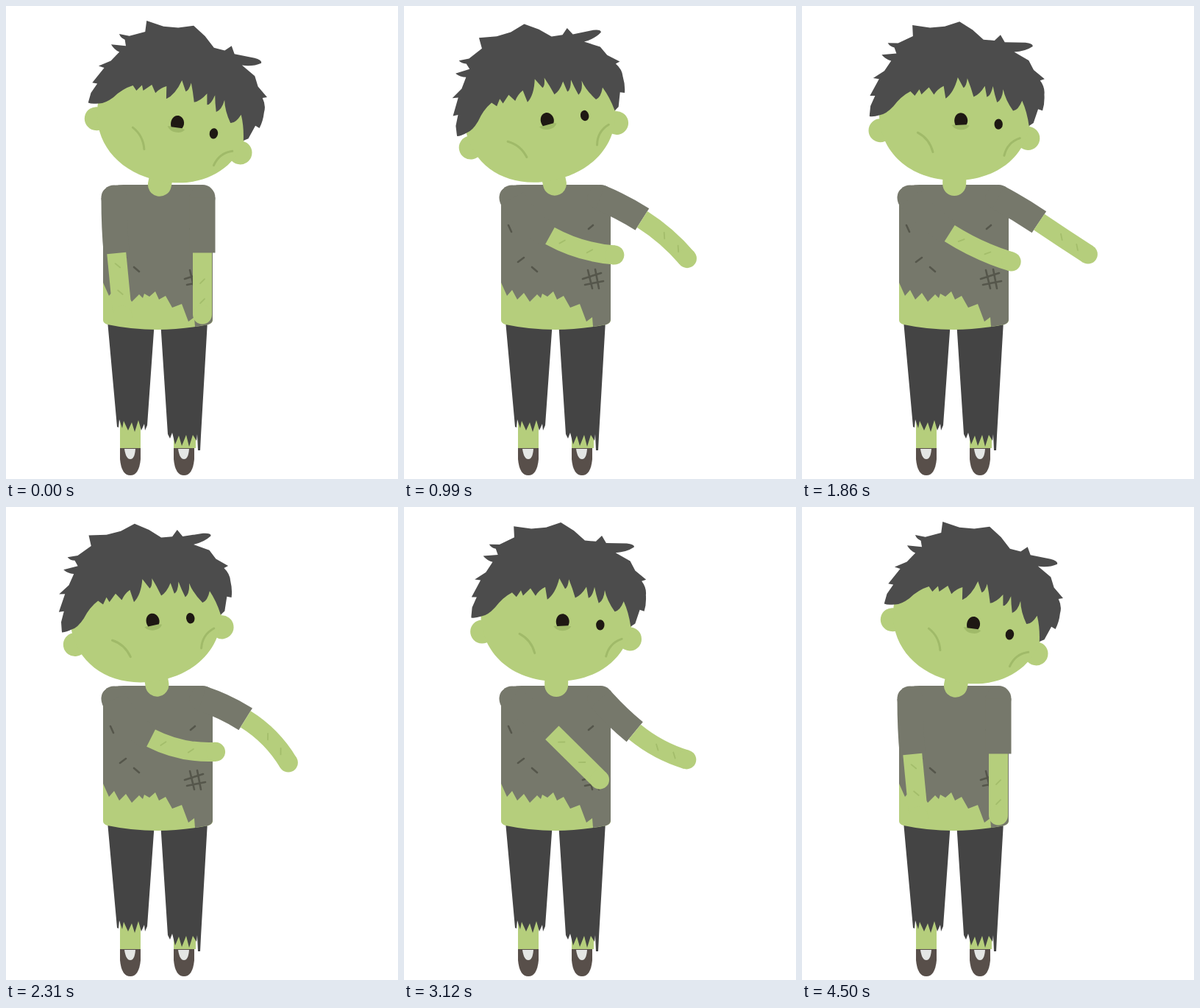
Recreate the animation shown at these times as an HTML page. Size 533 by 643 pixels, loop 4530 ms.

```html
<!DOCTYPE html>
<html>
<head>
<meta charset="utf-8">
<style>
html, body { margin: 0; height: 100%; overflow: hidden; background: #fff; }
svg { display: block; width: 100vw; height: 100vh; }
.skin { fill: #b5ce7c; }
.shirt { fill: #76786b; }
.hair { fill: #4c4c4c; }
.pants { fill: #444; }
.eye { fill: #1e1813; }
.crease { fill: none; stroke: #a0ba69; stroke-width: 3; stroke-linecap: round; }
.stitch { fill: none; stroke: #55564b; stroke-width: 2.6; stroke-linecap: round; }
.sleeve { fill: none; stroke: #76786b; stroke-width: 35; }
.forearm { fill: none; stroke: #b5ce7c; stroke-width: 26; }
.scar { stroke: #a3bd6b; stroke-width: 1.8; stroke-linecap: round; }
</style>
</head>
<body>
<svg viewBox="0 0 533 643" preserveAspectRatio="none">
  <defs>
    <g id="shoe">
      <path fill="#584f4a" d="M155 601H183V616Q181 638 169 638Q157 638 155 616Z"/>
      <path fill="#e4e6e4" d="M161 602H176Q175 616 169 616Q163 616 161 602Z"/>
    </g>
  </defs>

  <path class="skin" d="M155 555H183V601H155ZM228 575H258V601H228Z"/>
  <use href="#shoe"/>
  <use href="#shoe" x="73"/>
  <path class="pants" d="M138 428L151 572 153 573 154 562 158 574 160 564 166 577 171 566 175 579 180 563 184 577 188 568 189 577 192 570 202 428Z"/>
  <path class="pants" d="M210 428L220 582 223 588 226 580 230 596 235 584 239 598 245 583 249 599 254 583 259 591 260 582 261 604H264L265 584 274 428Z"/>

  <path class="skin" d="M132 370V427Q132 431 138 433Q205 447 275 433Q281 431 281 427V370Z"/>
  <path class="shirt" d="M130 262Q129 252 136 248Q146 243 160 243H262Q281 243 281 262V426Q281 431 275 433L257 436 256 423 248 429 239 405 226 410 217 394 208 399 203 388 195 395 188 391 186 397 181 392 171 402 163 390 154 399 147 386 140 394 132 376V270Z"/>
  <path class="stitch" d="M142 298L146 307M155 348L163 342M174 355L181 361M251 303L257 298M243 371L268 363M246 379L271 374M250 359L256 384M260 358L265 384"/>

  <g id="arms"></g>

  <g id="head">
    <path class="skin" d="M191 222H223V242A16 16 0 0 1 191 242Z"/>
    <circle class="skin" cx="105" cy="171" r="16"/>
    <circle class="skin" cx="306" cy="178" r="16"/>
    <path class="skin" d="M103 148C104 200 146 237 206 237S308 200 309 148Q290 70 206 70Q122 70 103 148Z"/>
    <path class="hair" d="M90 150L91 138 97 124 90 124 102 101 94 100 109 90 118 76Q110 74 105 68L125 66 122 58Q116 57 113 52L127 52 147 42 146 27 170 30 190 28 210 21 228 32 243 45 258 46 266 38 272 48 300 48Q311 49 310 53Q300 60 285 61L305 72 312 85 327 97 321 99Q328 108 327 118Q328 130 325 140L319 138 313 157 307 161Q304 142 297 127Q292 140 285 141Q274 126 271 112Q270 126 263 130Q259 118 257 108Q254 122 249 123L246 108Q239 120 231 123Q227 110 222 98Q221 109 217 111L209 97Q204 118 193 126L190 109Q182 113 177 121L170 111 160 121 157 114 151 123 145 117Q132 124 122 138Q112 149 104 150Q95 153 90 152Z"/>
    <path class="crease" d="M156 173Q172 181 177 199M295 178Q278 184 274 202"/>
    <g id="eye">
      <path fill="#a0ba69" d="M202 162Q214 159 226 162Q223 168 214 168Q206 168 202 162Z"/>
      <path class="eye" d="M207 162C203 154 207 145 214 145S226 154 222 161Z"/>
    </g>
    <ellipse class="eye" cx="265.5" cy="159.5" rx="5.7" ry="7.2"/>
  </g>
</svg>
<script>
const LOOP = 4530, RAD = Math.PI / 180;
const $ = id => document.getElementById(id);

// time, tilt in degrees, scale of the big eye
const headKeys = [
  [300, 13, 1], [1020, -10, 1], [1800, 3, 1], [2540, -10, 1], [3120, 2.5, 1],
  [3510, 5.8, 1], [3840, 10.5, .7], [4170, 13, 1]
];

// poses: sleeve angle, sleeve length, forearm angle, forearm length, bulge
const poseTimes = [['rest', 300], ['lift', 660], ['droop', 850], ['reach', 1380],
  ['droop', 2310], ['reach', 2900], ['lower', 3120], ['rest', 3540]];
const armKeys = poses => poseTimes.map(([name, time]) => [time, ...poses[name]]);

// Smooth curve through the keys, flat at every turning point
function sample(keys, t) {
  const last = keys.length - 1;
  if (t <= keys[0][0]) return keys[0].slice(1);
  if (t >= keys[last][0]) return keys[last].slice(1);
  const i = keys.findIndex(k => k[0] > t) - 1;
  const [a, b] = [keys[i], keys[i + 1]];
  const span = b[0] - a[0], u = (t - a[0]) / span;
  const slope = (j, c) => {
    if (j === 0 || j === last) return 0;
    const [p, k, n] = [keys[j - 1], keys[j], keys[j + 1]];
    return (k[c] - p[c]) * (n[c] - k[c]) <= 0 ? 0 : (n[c] - p[c]) / (n[0] - p[0]);
  };
  return a.slice(1).map((v, n) => {
    const c = n + 1, s = u * u * (3 - 2 * u);
    return v + (b[c] - v) * s
      + span * u * (1 - u) * ((1 - u) * slope(i, c) - u * slope(i + 1, c));
  });
}

function add(parent, tag, attrs) {
  const el = document.createElementNS('http://www.w3.org/2000/svg', tag);
  for (const key in attrs) el.setAttribute(key, attrs[key]);
  return parent.appendChild(el);
}

function makeArm(x, y, scarSpots, scarSide, poses) {
  const g = $('arms'), keys = armKeys(poses);
  add(g, 'circle', { class: 'shirt', cx: x, cy: y, r: 17.5 });
  const sleeve = add(g, 'path', { class: 'sleeve' });
  const forearm = add(g, 'path', { class: 'forearm' });
  const hand = add(g, 'circle', { class: 'skin', r: 13 });
  const scars = scarSpots.map(() =>
    add(g, 'path', { class: 'scar', d: `M-3 ${-3 * scarSide}L3 ${3 * scarSide}` }));

  return t => {
    const [upper, upperLen, lower, lowerLen, bulge] = sample(keys, t);
    const ex = x + upperLen * Math.cos(upper * RAD), ey = y + upperLen * Math.sin(upper * RAD);
    const dx = Math.cos(lower * RAD), dy = Math.sin(lower * RAD);
    const hx = ex + lowerLen * dx, hy = ey + lowerLen * dy;
    const cx = (ex + hx) / 2 - 2 * bulge * dy, cy = (ey + hy) / 2 + 2 * bulge * dx;
    // the sleeve bends so that it runs straight into the forearm
    const kx = ex - (cx - ex) * .8, ky = ey - (cy - ey) * .8;
    sleeve.setAttribute('d', `M${x} ${y}Q${kx} ${ky} ${ex} ${ey}`);
    forearm.setAttribute('d', `M${ex} ${ey}Q${cx} ${cy} ${hx} ${hy}`);
    hand.setAttribute('cx', hx);
    hand.setAttribute('cy', hy);
    scars.forEach((scar, i) => {
      const u = scarSpots[i], side = 4 * bulge * u * (1 - u);
      const px = ex + u * lowerLen * dx - side * dy, py = ey + u * lowerLen * dy + side * dx;
      scar.setAttribute('transform', `translate(${px} ${py}) rotate(${lower})`);
    });
  };
}

const arms = [
  makeArm(147, 261, [.2, .63], -1, {
    rest: [87.5, 75, 84.5, 85, 0], lift: [39, 71, 35.7, 87, 0], droop: [46.7, 73, 12, 90, 6],
    reach: [36.4, 71, 38.6, 95, 0], lower: [40, 71, 44.6, 91, 0]
  }),
  makeArm(267, 260.5, [.46, .78], 1, {
    rest: [90, 75, 90, 84, 0], lift: [39.5, 71, 45.5, 84, -3], droop: [25.4, 65, 45.5, 83, -5],
    reach: [37, 64, 20, 76, 6], lower: [44, 65, 28, 80, 4]
  })
];

function draw(now) {
  const t = now % LOOP, [tilt, eye] = sample(headKeys, t);
  $('head').setAttribute('transform', `rotate(${tilt - 1.7} 204 252)`);
  $('eye').setAttribute('transform', `translate(214 157) scale(${eye}) translate(-214 -157)`);
  arms.forEach(pose => pose(t));
}

const start = performance.now();
function tick() {
  draw(performance.now() - start);
  requestAnimationFrame(tick);
}
tick();
</script>
</body>
</html>
```
